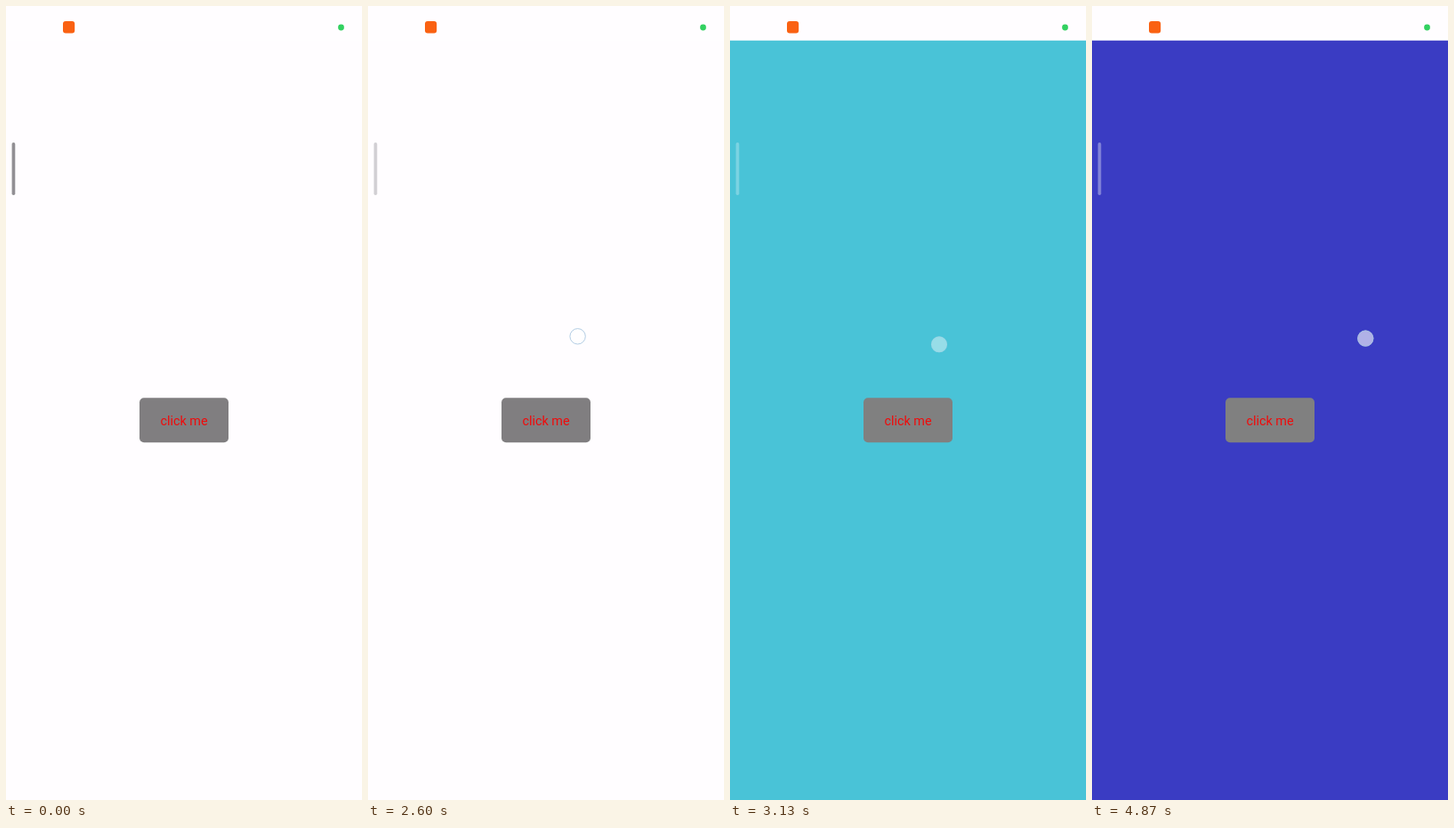
Write an HTML page with a canvas that moves like this. It is 400x890 px and loops after 4.94 s.

```html
<!DOCTYPE html>
<html lang="en">
<head>
<meta charset="utf-8">
<title>Tap to change colour</title>
<style>
  html, body { margin: 0; width: 100%; height: 100%; overflow: hidden; background: #fffdff; }
  canvas { display: block; width: 400px; height: 890px; }
</style>
</head>
<body>
<canvas id="stage"></canvas>
<script>
const W = 400, H = 890, LOOP = 4940;
const canvas = document.getElementById('stage');
const ctx = canvas.getContext('2d');
const ratio = window.devicePixelRatio || 1;
canvas.width = W * ratio;
canvas.height = H * ratio;
ctx.scale(ratio, ratio);

const PAPER = '#fffdff';
const FADE = 140, GONE = 200; // ms after touch down

// Touches; "color" is the page colour set on release.
const taps = [
  { t: 930, x: 197.7, y: 454 },
  { t: 1400, x: 198, y: 455 },
  { t: 1870, x: 198, y: 455 },
  { t: 2530, x: 235.6, y: 370.3, color: '#3a97dd' },
  { t: 2990, x: 235, y: 379.3, color: '#49c3d7' },
  { t: 3530, x: 239.3, y: 380.7, color: '#3a3cc3' },
  { t: 4400, x: 312.5, y: 359 },
  { t: 4870, x: 307.3, y: 372.6 }
];

// Edge handle: start time and fill.
const handleStates = [
  [0, '#929094'],
  [2600, '#d2d0d4'],
  [2670, 'rgba(145,145,150,0.38)'],
  [2730, 'rgba(255,255,255,0.15)'],
  [2800, 'rgba(255,255,255,0.28)'],
  [4400, 'rgba(255,255,255,0.36)']
];

function box(x, y, w, h, r, fill) {
  ctx.fillStyle = fill;
  ctx.beginPath();
  ctx.roundRect(x, y, w, h, r);
  ctx.fill();
}

function disc(x, y, r, fill) {
  ctx.fillStyle = fill;
  ctx.beginPath();
  ctx.arc(x, y, r, 0, Math.PI * 2);
  ctx.fill();
}

function pageColor(t) {
  return taps.reduce((c, tap) => tap.color && t >= tap.t + FADE ? tap.color : c, PAPER);
}

function drawTap(tap, t) {
  const age = t - tap.t;
  if (age < 0 || age >= GONE) return;
  const held = age < FADE;
  disc(tap.x, tap.y, 9, `rgba(255,255,255,${held ? 0.6 : 0.43})`);
  ctx.strokeStyle = `rgba(165,195,222,${held ? 0.85 : 0.25})`;
  ctx.lineWidth = 1;
  ctx.beginPath();
  ctx.arc(tap.x, tap.y, 8.7, 0, Math.PI * 2);
  ctx.stroke();
}

function draw(t) {
  ctx.fillStyle = PAPER;
  ctx.fillRect(0, 0, W, H);
  const color = pageColor(t);
  ctx.fillStyle = color;
  ctx.fillRect(0, 38.7, W, H);

  box(64, 17, 13.2, 13.5, 3, '#fa6112');
  disc(376.5, 24, 3.4, '#32d160');

  box(150, 439.3, 100, 50, 5, color === PAPER ? '#807e80' : '#808080');
  ctx.fillStyle = '#f00a0a';
  ctx.font = '14.4px Roboto, "Noto Sans", sans-serif';
  ctx.textAlign = 'center';
  ctx.textBaseline = 'alphabetic';
  ctx.fillText('click me', 200, 469.8);

  const handle = handleStates.filter(s => t >= s[0]).pop();
  box(6.6, 153, 3.7, 59, 1.8, handle[1]);
  taps.forEach(tap => drawTap(tap, t));
}

const start = performance.now();
function tick() {
  draw((performance.now() - start) % LOOP);
  requestAnimationFrame(tick);
}
tick();
</script>
</body>
</html>
```
